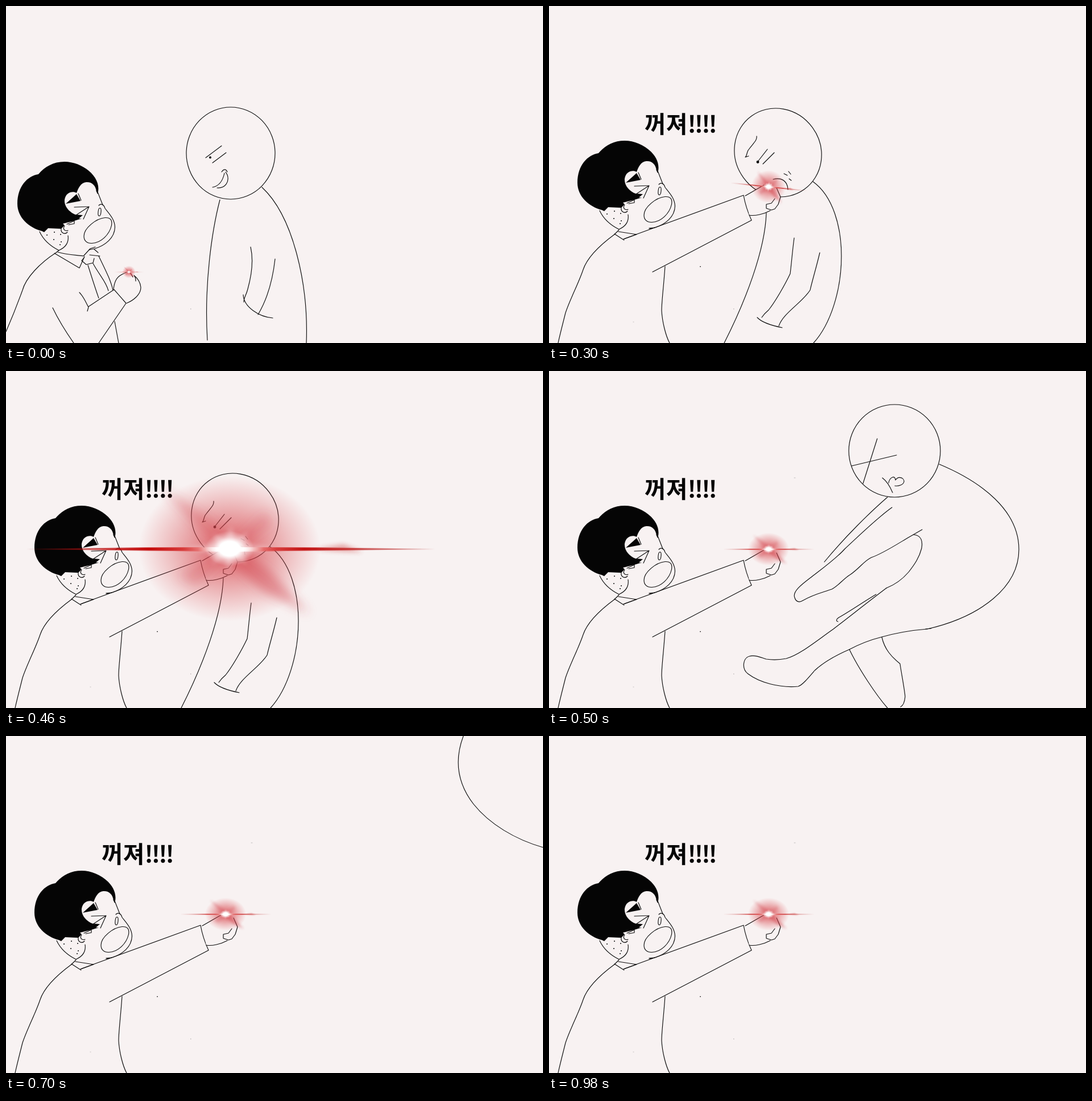
Recreate the animation shown at these times as an HTML page. Size 944x593 px, loop 1100 ms.

```html
<!DOCTYPE html>
<html lang="ko">
<head>
<meta charset="utf-8">
<title>Punch</title>
<style>
html, body { margin: 0; width: 100%; height: 100%; overflow: hidden; background: #f8f2f2; }
svg { display: block; width: 100vw; height: 100vh; }
.ink { fill: none; stroke: #0c0c0c; stroke-width: 1.15; stroke-linecap: round; stroke-linejoin: round; }
.solid { fill: #050505; stroke: none; }
.skin { fill: #f8f2f2; stroke: none; }
text { font: 700 41px "Noto Sans CJK KR", "Noto Sans CJK", "Noto Sans CJK JP", sans-serif; }
.tight { letter-spacing: -.07em; }
</style>
</head>
<body>
<svg viewBox="0 0 944 593">
  <defs>
    <radialGradient id="haze">
      <stop offset="0" stop-color="#d4444c" stop-opacity=".82"/>
      <stop offset=".3" stop-color="#d8484e" stop-opacity=".62"/>
      <stop offset=".65" stop-color="#d8484e" stop-opacity=".3"/>
      <stop offset="1" stop-color="#dc4a50" stop-opacity="0"/>
    </radialGradient>
    <radialGradient id="core">
      <stop offset="0" stop-color="#fff"/>
      <stop offset=".42" stop-color="#fff"/>
      <stop offset=".65" stop-color="#fff" stop-opacity=".5"/>
      <stop offset="1" stop-color="#fff" stop-opacity="0"/>
    </radialGradient>
    <linearGradient id="beam">
      <stop offset="0" stop-color="#b01818" stop-opacity=".5"/>
      <stop offset=".3" stop-color="#c40808"/>
      <stop offset=".42" stop-color="#e05050"/>
      <stop offset=".47" stop-color="#fff"/>
      <stop offset=".53" stop-color="#fff"/>
      <stop offset=".58" stop-color="#e05050"/>
      <stop offset=".68" stop-color="#c41414"/>
      <stop offset="1" stop-color="#b01818" stop-opacity=".5"/>
    </linearGradient>
    <filter id="soft" x="-50%" y="-50%" width="200%" height="200%"><feGaussianBlur stdDeviation="9"/></filter>
    <filter id="fuzz" x="-50%" y="-100%" width="200%" height="300%"><feGaussianBlur stdDeviation="4"/></filter>

    <g id="flare">
      <ellipse rx="160" ry="128" fill="url(#haze)"/>
      <g filter="url(#soft)" fill="#d0404a">
        <path d="M0 -10L70 38L140 114L60 76L-10 14Z" opacity=".45"/>
        <path d="M0 12L-62 -42L-120 -108L-40 -58L10 -10Z" opacity=".32"/>
        <path d="M-10 0L-90 48L-60 66L4 8Z" opacity=".25"/>
        <path d="M-6 0L62 -66L78 -44L8 8Z" opacity=".22"/>
      </g>
      <path d="M-358 1L-150 -2L0 -3L150 -2L362 1L150 3.500L0 5L-150 3.500Z" fill="url(#beam)"/>
      <path d="M150 1L200 -7L234 6L190 4Z" fill="#c83030" opacity=".45" filter="url(#fuzz)"/>
      <path d="M-80 -1L-20 -8L-30 -28L-8 -14L2 -40L10 -14L32 -30L24 -8L80 -1L24 9L30 28L8 14L-2 40L-8 14L-32 28L-22 9Z" fill="#fff" opacity=".35" filter="url(#fuzz)"/>
      <ellipse rx="43" ry="31" fill="url(#core)"/>
    </g>

    <g id="head" class="ink">
      <path class="solid" d="M87 259C98 246 113 237 133 237C163 237 197 262 192 290L189 290C188 278 180 272 171 273C161 274 157 284 154 292C148 288 135 290 133 304C132 316 142 326 152 330L165 331L158 337L163 337L150 341L130 346L133 349L127 355L104 354L97 361L93 359C70 353 50 335 50 311C50 280 68 262 87 259Z"/>
      <path class="solid" d="M135 311L154 294L161 306Z"/>
      <path d="M157 293L162 305M150 317L176 316L166 338M176 316L153 331M189 288L191 293M191 290L200 313"/>
      <path d="M193 314C197 310 202 312 204 319C211 328 221 338 221.500 352C221 371 205 384 186 390L176 392"/>
      <ellipse cx="194.500" cy="325.500" rx="2.500" ry="7" transform="rotate(6 194.500 325.500)"/>
      <path d="M167 368C167 354 188 337 204 335.500C214 335 217 340 215.500 349C212 365 197 380 181 380.500C172 381 167 376 167 368Z"/>
      <path d="M137 347L150 341L150 346L140 348M133 350C129 355 133 360 139 358M127 355C126 362 133 366 138 361"/>
      <path d="M89 360C95 373 105 384 123 393C134 388 141 380 139 367"/>
      <path stroke-width="1.900" d="M102 366h.1M115 361h.1M126 365h.1M114 374h.1M127 378h.1M125 383h.1"/>
    </g>
  </defs>

  <g class="ink" data-from="0" data-to="0">
    <ellipse cx="395" cy="259" rx="78" ry="81"/>
    <path d="M376 341C362 395 348 490 354 588M450 319C505 370 532 490 528 593"/>
    <path d="M430 424C436 450 430 480 425 498C422 510 418 513 418 521M417 508C418 530 445 547 469 549M473 445C468 490 455 523 443 543"/>
    <path d="M351 267L379 246M363 276L387 258M379 292C383 286 387 287 389 292M384 294C381 308 374 317 363 319M371 320C386 321 393 309 389 297L386 292"/>
    <circle class="solid" cx="359" cy="266.500" r="2"/>
    <use href="#head" x="-30" y="37"/>
    <path d="M93 430L88 434C60 452 35 478 29 500C20 525 10 550 0 573"/>
    <path d="M85 435L129 461L138 441M91 433C108 438 122 438 137 440M137 439L148 427L157 424M155 428L162 434M147 438L165 440"/>
    <path d="M137 443L133 448L141 455L153 452L155 444M144 456C150 475 158 500 163 514M153 453C165 475 176 485 180 501M163 440C175 465 184 482 188 500"/>
    <path d="M129 504C137 512 141 523 145 530L143 537M145 529L190 499L211 523L163 593M82 531C92 552 105 573 119 593M191 555L198 593"/>
    <path d="M189 499C190 488 194 478 201 474C206 471 210 469 215 468M212 523C224 518 237 508 237 495C236 485 230 478 225 474C228 478 228 480 228 484M219 470L223 477"/>
  </g>

  <g class="ink" data-from="1" data-to="2">
    <ellipse rx="79.500" ry="75" transform="translate(402.500 258) rotate(54)"/>
    <path d="M382 364C380 430 345 520 308 593M464 309C500 335 514 390 514 440C514 500 495 560 465 593"/>
    <path d="M431 408C428 430 426 455 424 471C415 490 398 520 386 535C380 540 376 545 374 548M476 434C470 460 463 482 459 500C445 522 412 540 404 563M366 548C375 558 395 563 410 566"/>
    <path d="M365 229C366 237 360 240 350 254C347 260 348 264 345 266L351 264M366 275L384 252M376 278L396 258M394 305C406 302 419 305 420 323M413 295L419 298M421 291L425 296M422 304L426 307"/>
    <circle class="solid" cx="367" cy="274.500" r="2.400"/>
  </g>

  <g class="ink" data-from="3" data-to="3">
    <ellipse cx="607.500" cy="140.500" rx="80.500" ry="81.500"/>
    <path d="M532 167L611 148M577 119L552 198M586 188C594 194 599 202 604 214M597 197C599 186 609 183 609 192C615 183 625 189 624 195C623 200 615 203 608 202"/>
    <path d="M686 164C760 195 826 245 826 314C826 380 760 432 665 454C640 456 610 461 585 468C565 473 545 481 528 490C500 502 480 515 467 527C455 541 445 553 438 555C405 558 370 548 350 533C338 524 341 505 352 502C362 499 372 504 382 507C395 509 407 508 417 506C440 500 470 475 500 454C535 427 560 407 593 382"/>
    <path d="M595 222C565 248 520 292 484 336M603 240C575 260 545 290 520 313C505 330 480 348 462 362C445 375 427 388 432 399C434 406 440 408 446 404C465 393 480 390 497 384C510 377 518 365 530 358C545 348 555 333 567 328C585 322 610 306 630 294L656 279"/>
    <path d="M641 288C655 289 657 300 655 312C651 328 643 340 632 354C620 368 608 376 593 382M575 393C550 408 527 424 509 434C505 437 504 440 508 441M662 454L672 453"/>
    <path d="M528 490C545 525 575 570 595 593M585 468C590 490 602 503 617 515C620 535 625 560 626 573C625 585 622 589 618 591"/>
  </g>

  <g class="ink" data-from="4" data-to="4">
    <ellipse rx="86" ry="78.300" transform="translate(844 106.500) rotate(31)"/>
    <path d="M782 70L785 60C789 47 801 38 817 40C832 42 839 50 837 62C834 85 836 95 832 107C825 122 815 127 802 121C785 110 778 85 782 66M851 42L894 101M873 44L854 118"/>
    <path d="M757 97C640 140 560 240 561 330C562 430 630 510 731 543C800 570 890 587 928 571M725 540L732 544"/>
    <path d="M853 184C846 260 865 330 883 390M780 241C783 270 805 325 853 406C870 435 895 458 915 455C930 453 935 445 929 438C920 420 902 408 894 397C890 391 886 389 885 392"/>
    <path d="M792 295C775 345 780 410 810 455C845 507 895 530 944 527M727 396C748 450 835 545 900 543C910 543 917 542 921 540M921 540C918 533 930 532 944 535M925 569C932 572 938 574 944 574"/>
  </g>

  <path class="ink" data-from="5" data-to="5" d="M804 0C787 45 795 85 822 120C850 155 895 182 944 196"/>

  <g class="ink" data-from="1" data-to="6">
    <use href="#head"/>
    <path d="M115 402L123 394M115 401L132 412M122 397L154 402L132 410M176 391L186 390"/>
    <path d="M131 410L342 333C345 350 349 362 356 377L182 468"/>
    <path class="skin" d="M345 334L378 315L400 320L407 338L392 360L352 368Z"/>
    <path d="M345 334L378 315M352 368C362 370 378 366 389 360M400 320L407 336L403 349L397 357L391 359L382 356L382 349L391 347L397 339"/>
    <path d="M115 402C92 419 68 440 60 464C52 488 36 518 29 540C24 560 20 575 16 593M204 458C201 500 198 520 198 536C199 555 205 580 212 593"/>
    <path stroke-width="1.700" d="M266 458.500h.1"/>
    <path stroke-width=".8" opacity=".3" d="M148 556h1M431 188h2"/>
    <text class="solid" x="168" y="223">꺼져<tspan class="tight">!!!!</tspan></text>
  </g>
  <path class="ink" stroke-width=".8" opacity=".4" d="M324.500 533h.5"/>
  <use id="glow" href="#flare"/>
</svg>
<script>
const LOOP = 1100;
const starts = [0, 300, 400, 500, 600, 700, 800];
const poses = [...document.querySelectorAll('[data-from]')];
const glow = document.getElementById('glow');

// x, y, scale x, scale y, angle
const rest = [386, 313.500, .226, .226, 0];
const flares = [[216, 468, .073, .085, 0], [386, 318, .19, .226, 6], [393, 312.500, 1, 1, 0]];

function draw(ms) {
  const t = ms % LOOP;
  const step = starts.filter(s => s <= t).length - 1;
  for (const p of poses) {
    const on = step >= +p.dataset.from && step <= +p.dataset.to;
    p.style.display = on ? '' : 'none';
  }
  const [x, y, sx, sy, a] = flares[step] || rest;
  glow.setAttribute('transform', `translate(${x} ${y}) rotate(${a}) scale(${sx} ${sy})`);
}

const t0 = performance.now();
function tick() {
  draw(performance.now() - t0);
  requestAnimationFrame(tick);
}
tick();
</script>
</body>
</html>
```
